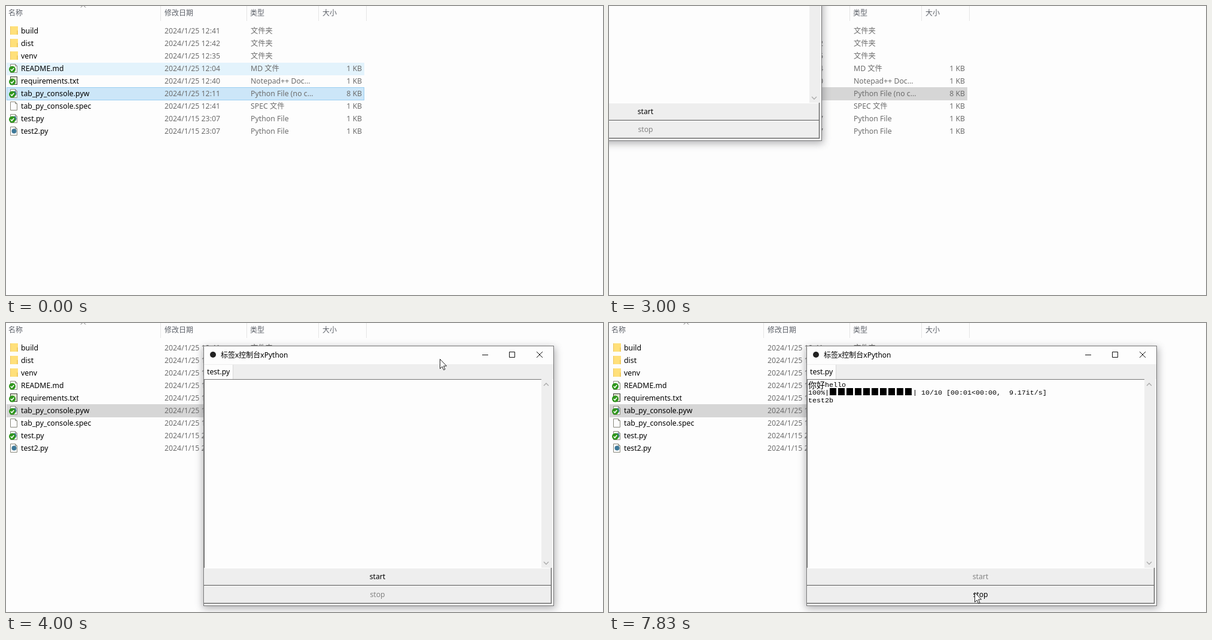
Recreate the animation shown at these times as an HTML page. Size 998x484 px, loop 8 s.

```html
<!DOCTYPE html>
<html lang="zh">
<head>
<meta charset="utf-8">
<title>tab_py_console</title>
<style>
  html, body { margin: 0; width: 100%; height: 100%; overflow: hidden; background: #fdfdfd; }
  svg { display: block; width: 998px; height: 484px; }
  text { font: 12.3px "Noto Sans", "Noto Sans CJK SC", "Noto Sans CJK", sans-serif; white-space: pre; }
  .head { font-size: 12px; fill: #5c6068; }
  .dim { fill: #6d6d6d; }
  .ui { font-size: 12.2px; }
  .title { font-size: 12px; }
  .mono { font: 11.667px "Liberation Mono", monospace; }
  .wide { font-size: 14px; }
  .line { fill: none; stroke: #111; }
</style>
</head>
<body>
<svg id="stage" viewBox="0 0 998 484"></svg>
<script>
const LOOP = 8000, FPS = 6;
const PAPER = '#fdfdfd', FACE = '#eeeeee', EDGE = '#757575', DISABLED = '#838383';
const ROW_TOP = 31, ROW_STEP = 21, README = 3, SELECTED = 5;

const rect = (x, y, w, h, fill, more = '') =>
  `<rect x="${x}" y="${y}" width="${w}" height="${h}" fill="${fill}" ${more}/>`;
const text = (x, y, content, cls = '', more = '') =>
  `<text x="${x}" y="${y}" class="${cls}" ${more}>${content.replace(/</g, '&lt;')}</text>`;
const path = (d, more = 'class="line"') => `<path d="${d}" ${more}/>`;

// name, date, type, size, icon, has check badge
const files = [
  ['build', '2024/1/25 12:41', '文件夹', '', 'folder'],
  ['dist', '2024/1/25 12:42', '文件夹', '', 'folder'],
  ['venv', '2024/1/25 12:35', '文件夹', '', 'folder'],
  ['README.md', '2024/1/25 12:04', 'MD 文件', '1 KB', 'page', true],
  ['requirements.txt', '2024/1/25 12:40', 'Notepad++ Doc...', '1 KB', 'note', true],
  ['tab_py_console.pyw', '2024/1/25 12:11', 'Python File (no c...', '8 KB', 'script', true],
  ['tab_py_console.spec', '2024/1/25 12:41', 'SPEC 文件', '1 KB', 'page'],
  ['test.py', '2024/1/15 23:07', 'Python File', '1 KB', 'script', true],
  ['test2.py', '2024/1/15 23:07', 'Python File', '1 KB', 'script'],
];

function icon(kind, y, checked) {
  let art;
  if (kind === 'folder') {
    art = rect(7, y + 3, 13, 14, '#ffe07a') + rect(7, y + 3, 1, 14, '#eec45c') + rect(18, y + 10, 2, 7, '#f0cb60');
  } else if (kind === 'note') {
    art = rect(7.5, y + 3.5, 11, 13, '#e3e8d4', 'stroke="#3c3c34"');
  } else {
    art = path(`M7.5 ${y + 3.5}h8l3 3v11h-11z`, `fill="${PAPER}" stroke="#88887c"`) +
      path(`M15.5 ${y + 3.5}v3h3`, 'fill="none" stroke="#88887c"');
    if (kind === 'script') art += `<circle cx="13.5" cy="${y + 10.5}" r="4" fill="#3d7898"/>`;
  }
  if (checked) {
    art += `<circle cx="10.5" cy="${y + 12}" r="5.5" fill="#2f961c"/>` +
      path(`M7.8 ${y + 12}l2 2.3 3.4-4.4`, 'fill="none" stroke="#fff" stroke-width="1.6"');
  }
  return art;
}

function fileList() {
  const heads = [[4, '名称'], [265, '修改日期'], [408, '类型'], [529, '大小']];
  return heads.map(([x, s]) => text(x, 16, s, 'head')).join('') +
    [258, 402, 522, 602].map(x => rect(x, 0, 1, 25, '#e5e5e5')).join('') +
    path('M125 2.5l4-4 4 4', 'fill="none" stroke="#6c6c6c"') +
    files.map(([name, date, type, size, kind, checked], i) => {
      const top = ROW_TOP + i * ROW_STEP, base = top + 15;
      return icon(kind, top, checked) + text(25, base, name) + text(265, base, date, 'dim') +
        text(409, base, type, 'dim') + text(595, base, size, 'dim', 'text-anchor="end"');
    }).join('');
}

const button = (y, label) =>
  rect(1, y, 581, 30, FACE) + path(`M1.5 ${y + 29}V${y + .5}H581`, 'fill="none" stroke="#fff"') +
  path(`M1 ${y + 29.5}H581.5V${y}`, 'fill="none" stroke="#696969" stroke-width="1.4"') +
  text(291, y + 19, label, 'ui', `id="${label}" text-anchor="middle"`);

const appWindow = () =>
  rect(-1, 3, 589, 437, '#44444c', 'opacity=".42" filter="url(#soft)"') +
  rect(.5, .5, 585, 435, FACE, `stroke="${EDGE}"`) +
  rect(1, 1, 584, 30, PAPER) +
  '<circle cx="16" cy="15" r="5" fill="#222"/>' +
  text(29, 20, '标签x控制台xPython', 'title') +
  path('M466 15.5h10M511.5 10.5h9v9h-9zM557 10l10 10m0-10l-10 10') +
  rect(1, 32, 49, 24, PAPER) + rect(49, 32, 1, 24, '#d9d9d9') + text(6, 48, 'test.py', 'ui') +
  rect(583, 56, 2, 379, '#f7f7f7') + rect(1, 432, 584, 3, '#f7f7f7') +
  rect(1, 56, 564, 316, EDGE) + rect(2, 57, 563, 315, PAPER) +
  path('M569 67l4-4 4 4M569 362l4 4 4-4', 'fill="none" stroke="#a8a8a8" stroke-width="1.3"') +
  button(372, 'start') + button(402, 'stop') + '<g id="output"></g>';

document.getElementById('stage').innerHTML =
  '<defs><filter id="soft" x="-10%" y="-10%" width="120%" height="120%"><feGaussianBlur stdDeviation="6.5"/></filter></defs>' +
  rect(0, 0, 998, 484, PAPER) +
  rect(1, ROW_TOP + README * ROW_STEP + 1, 598, 21, '#e3f3fc', 'id="hover"') +
  rect(1.5, ROW_TOP + SELECTED * ROW_STEP + .5, 597, 21, '', 'id="selection"') +
  fileList() + `<g id="app">${appWindow()}</g>` +
  path('M.5.5V16.5L4.2 13L6.6 18.6L9 17.6L6.6 12H11.5Z', `id="pointer" fill="${PAPER}" stroke="#222"`);

const parts = Object.fromEntries(
  ['hover', 'selection', 'app', 'pointer', 'output', 'start', 'stop'].map(id => [id, document.getElementById(id)]));

// Keys are [time, x, y]
const pointerPath = [[160, 20, 112], [500, 90, 146], [1170, 95, 148], [1500, 90, 135], [1833, 65, 45], [2330, 40, -25], [2660, -114, -356]];
const dragPath = [[2667, -510, -378], [2833, -430, -345], [3000, -230, -210], [3333, 163, -12], [3667, 322, 36], [3833, 330, 38]];
const clickPath = [[4000, 725, 60], [4333, 712, 95], [4667, 622, 310], [5000, 566, 416], [6333, 570, 420], [6833, 572, 421], [7500, 606, 446], [7833, 611, 451]];

function along(keys, t) {
  const next = keys.findIndex(key => key[0] > t);
  if (next < 0) return keys.at(-1).slice(1);
  if (next === 0) return keys[0].slice(1);
  const [t0, x0, y0] = keys[next - 1], [t1, x1, y1] = keys[next], p = (t - t0) / (t1 - t0);
  return [x0 + (x1 - x0) * p, y0 + (y1 - y0) * p].map(Math.round);
}

function pointerAt(t, [wx, wy]) {
  if (t < 2660) return along(pointerPath, t);
  return t < 3900 ? [wx + 396, wy + 22] : along(clickPath, t);
}

function consoleOutput(t) {
  if (t < 5640) return '';
  const done = Math.min(10, Math.floor((t - 5650) * .0091));
  const rate = done === 0 ? '00:00<?, ?it/s' :
    done === 10 ? '00:01<00:00,  9.17it/s' : '00:00<00:00,  9.08it/s';
  let out = text(3, 70.5, '你好', 'wide') + text(31, 69, 'hello', 'mono') +
    text(3, 82, `${done * 10}%|`.padStart(5), 'mono');
  for (let i = 0; i < done; i++) out += rect(39 + 14 * i, 71, 11, 12, '#000');
  out += text(108 + 7 * done, 82, `| ${done}/10 [${rate}]`, 'mono');
  return t < 6990 ? out : out + text(3, 95, 'test2b', 'mono');
}

const place = (node, [x, y]) => node.setAttribute('transform', `translate(${x} ${y})`);
const show = (node, on) => node.setAttribute('visibility', on ? 'visible' : 'hidden');

function draw(time) {
  const t = Math.floor((time + 5) * FPS / 1000) * 1000 / FPS;
  const corner = along(dragPath, t);
  const focused = t < 1330, running = t > 5490;

  show(parts.hover, t < 300);
  parts.selection.setAttribute('fill', focused ? '#cce6f8' : '#d6d6d6');
  parts.selection.setAttribute('stroke', focused ? '#9bcff2' : '#d6d6d6');

  show(parts.app, t > 1490);
  place(parts.app, corner);
  show(parts.pointer, t > 0);
  place(parts.pointer, pointerAt(t, corner));

  parts.start.setAttribute('fill', running ? DISABLED : '#000');
  parts.stop.setAttribute('fill', running ? '#000' : DISABLED);
  parts.output.innerHTML = consoleOutput(t);
}

const began = performance.now();
function tick() {
  draw((performance.now() - began) % LOOP);
  requestAnimationFrame(tick);
}
tick();
</script>
</body>
</html>
```
